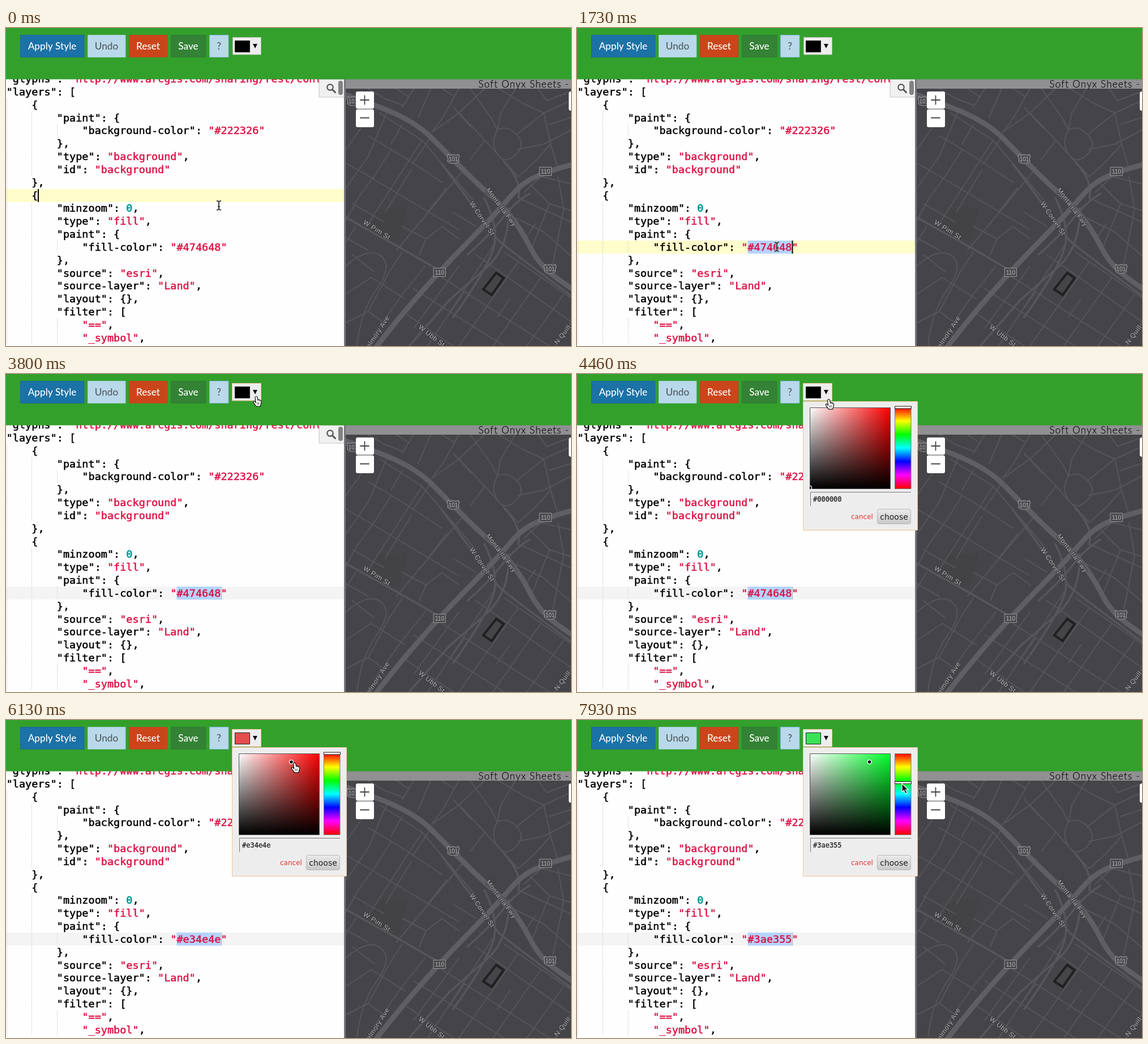
Recreate the animation shown at these times as an HTML page with a canvas. Size 998 by 561 pixels, loop 8000 ms.

```html
<!DOCTYPE html>
<html lang="en">
<head>
<meta charset="utf-8">
<title>Style editor</title>
<style>
html, body { margin: 0; width: 100%; height: 100%; overflow: hidden; background: #fefefe; }
canvas { display: block; }
</style>
</head>
<body>
<canvas id="stage" width="998" height="561"></canvas>
<script>
const ctx = document.getElementById('stage').getContext('2d');
const LOOP = 8000, STEP = 1000 / 15;
const MONO = '"DejaVu Sans Mono", monospace', SANS = '"DejaVu Sans", sans-serif';
const UI = 'Lato, sans-serif', MAP = '"Liberation Sans", Arial, sans-serif';
const CHAR = 11.14, LEFT = 0.7, LINE = 22.83, TOP = 112.4;

// Rows are [time, ...values]
const POINTER = [
  [70, 376, 313], [600, 353, 386], [2270, 353, 386], [2400, 385, 254],
  [2600, 385, 254], [2800, 398, 129], [2930, 398, 129], [3130, 430, 61],
  [3270, 430, 61], [3600, 442, 40], [4330, 442, 40], [4660, 454, 64],
  [5000, 454, 64], [5260, 464, 65], [5530, 464, 65], [5860, 508, 76],
  [6070, 508, 76], [6530, 520, 75], [6730, 520, 75], [6800, 522, 73],
  [7130, 574, 95], [7400, 574, 109], [7800, 574, 109], [7930, 574, 112]
];
const HSV = [
  [5000, 0, .27, .9686], [5260, 0, .332, .9686], [5530, 0, .332, .9686],
  [5860, 0, .64, .8902], [6070, 0, .64, .8902], [6530, 0, .744, .8902],
  [7070, 0, .744, .8902], [7130, 100, .744, .8902], [7400, 121, .744, .8902],
  [7800, 121, .744, .8902], [7930, 129.6, .744, .8902]
];

const CODE = [
  '"glyphs": "http://www.arcgis.com/sharing/rest/content',
  '"layers": [', '    {', '        "paint": {',
  '            "background-color": "#222326"', '        },',
  '        "type": "background",', '        "id": "background"', '    },',
  '    {', '        "minzoom": 0,', '        "type": "fill",', '        "paint": {',
  '            "fill-color": "$"', '        },', '        "source": "esri",',
  '        "source-layer": "Land",', '        "layout": {},', '        "filter": [',
  '            "==",', '            "_symbol",'
];

const STREETS = [
  'M600 283L640 226L672 150M600 215L640 158M640 345L735 198M690 392L812 246M600 340L622 300L650 262' +
  'M600 238L645 264L722 310L800 356M640 190L700 226L770 272M660 150L735 198L830 310M612 310L668 342' +
  'M680 205L700 170M718 240L752 190M650 262L680 215M690 292L716 250M745 325L778 282M670 325L690 292' +
  'M640 107L668 124L700 136M720 107L700 140M690 107L712 122M750 107L728 158M800 107L770 160L752 184M770 107L792 121',
  'M752 184L800 150L845 107M800 150L846 198L880 236L905 262M820 107L858 160L868 180Q885 170 902 188T900 224T868 222T868 180' +
  'M900 107L874 150L868 180M846 198L820 232M902 188L950 150L998 128M904 214L950 205L998 180M950 150L962 205L975 248' +
  'M870 107L915 134L950 150M940 107L955 128L998 112M960 170L998 158M905 262L935 235L962 205M790 140L822 175',
  'M600 420Q640 385 662 402T655 460T620 561M600 470L645 440L705 478M612 400L650 430M600 520L640 500L670 522' +
  'M700 395L676 432L640 500M740 420L700 470L650 540M720 460L880 561M770 440L960 561M700 500L790 561' +
  'M830 400L998 518M880 395L998 476M800 420L720 530M860 385L745 561M905 412L800 561M945 440L860 561' +
  'M985 470L920 561M998 520L970 561M810 466L780 508M890 478L868 510',
  'M905 300L998 342M925 275L960 310L998 322M900 335L950 360L998 402M960 310L930 385M985 320L965 420M935 345L915 375' +
  'M915 290L945 262L998 275M975 262L985 320M770 350L800 372M790 325L830 350M600 370L640 392M618 350L600 378' +
  'M700 350L742 372L770 350M742 372L730 400'
];
const AVENUES = 'M600 334L650 362L704 392L766 428M770 240L822 310L870 375Q900 400 998 472' +
  'M713 560L783 480L854 418Q890 380 888 318M905 300Q912 270 880 236' +
  'M815 400Q850 370 875 338T925 292M845 300Q870 350 862 385T790 510';
const FREEWAYS = 'M600 118C650 136 712 154 752 194S822 266 850 290S905 345 925 385S970 440 1000 460' +
  'M652 565C700 503 730 470 766 430S850 345 880 310S920 262 1000 241';

function box(x, y, w, h, fill, stroke, r = 0) {
  ctx.beginPath();
  ctx.roundRect(x, y, w, h, r);
  if (fill) { ctx.fillStyle = fill; ctx.fill(); }
  if (stroke) { ctx.strokeStyle = stroke; ctx.lineWidth = 1; ctx.stroke(); }
}

function text(s, x, y, font, color, align = 'left', spacing = 0, weight = 0) {
  ctx.font = font;
  ctx.fillStyle = ctx.strokeStyle = color;
  ctx.textAlign = align;
  ctx.letterSpacing = spacing + 'px';
  ctx.fillText(s, x, y);
  if (weight) { ctx.lineWidth = weight; ctx.strokeText(s, x, y); }
}

function path(d, color, width) {
  ctx.strokeStyle = color;
  ctx.lineWidth = width;
  ctx.stroke(new Path2D(d));
}

function shape(d, x, y, fill, stroke) {
  const p = new Path2D(d);
  ctx.save();
  ctx.translate(x, y);
  ctx.fillStyle = fill;
  ctx.fill(p);
  ctx.strokeStyle = stroke;
  ctx.lineWidth = 1.2;
  ctx.stroke(p);
  ctx.restore();
}

function clipTo(x, y, w, h, draw) {
  ctx.save();
  ctx.beginPath();
  ctx.rect(x, y, w, h);
  ctx.clip();
  draw();
  ctx.restore();
}

function at(rows, t) {
  let i = rows.findIndex(r => r[0] > t);
  if (i < 0) i = rows.length;
  const a = rows[Math.max(i - 1, 0)], b = rows[Math.min(i, rows.length - 1)];
  const k = b[0] > a[0] ? (t - a[0]) / (b[0] - a[0]) : 0;
  return a.slice(1).map((v, j) => v + (b[j + 1] - v) * k);
}

function hex(h, s, v) {
  return '#' + [5, 3, 1].map(n => {
    const k = (n + h / 60) % 6;
    const c = v - v * s * Math.max(0, Math.min(k, 4 - k, 1));
    return Math.round(c * 255).toString(16).padStart(2, '0');
  }).join('');
}

function header() {
  box(0, 0, 998, 90.5, '#33a02c');
  const button = (label, x, w, fill, edge, color) => {
    box(x + .5, 12.5, w - .5, 39, fill, edge);
    text(label, x + w / 2, 38, '500 17.2px ' + UI, color, 'center');
  };
  button('Apply Style', 25, 113, '#1b72a6', '#1c6a8c', '#fff');
  button('Undo', 144, 67, '#b9d9ea', '#9accc4', '#565c60');
  button('Reset', 217, 68, '#cb451b', '#a8521c', '#fff');
  button('Save', 291, 62, '#348235', '#2f7c30', '#fff');
  button('?', 359, 34, '#b9d9ea', '#80b4d8', '#4b5459');
}

function streetLabel(s, x, y, angle) {
  ctx.save();
  ctx.translate(x, y);
  ctx.rotate(angle * Math.PI / 180);
  ctx.lineWidth = 2;
  ctx.strokeStyle = '#39383c';
  ctx.font = '12px ' + MAP;
  ctx.textAlign = 'center';
  ctx.letterSpacing = '.5px';
  ctx.strokeText(s, 0, 4);
  text(s, 0, 4, '12px ' + MAP, '#b4b3b6', 'center', .5);
  ctx.restore();
}

function map() {
  box(600, 90, 398, 471, '#454449');
  shape('M655 320L708 318L694 374L645 362Z', 0, 0, '#434346', '#434346');
  ctx.lineJoin = ctx.lineCap = 'round';
  STREETS.forEach(d => path(d, '#56555a', 2));
  path(AVENUES, '#57565b', 3.5);
  path(FREEWAYS, '#5f5e63', 9);
  ctx.lineJoin = 'miter';
  path('M866 432L879 441L858 471L843 461Z', '#202022', 4);

  for (const [x, y] of [[613, 129], [790, 231], [961, 425]]) {
    shape('M-9 -8Q-5 -5 0 -8Q5 -5 9 -8L11 -4Q8 0 10 4Q7 8 0 8Q-7 8 -10 4Q-8 0 -11 -4Z', x, y, '#4b4a4e', '#98979a');
    text('101', x, y + 3.5, '10px ' + MAP, '#b4b3b6', 'center');
  }
  for (const [x, y] of [[953, 253], [766, 431]]) {
    box(x - 10.5, y - 7.5, 21, 15, '#4b4a4e', '#98979a');
    text('110', x, y + 4, '10.5px ' + MAP, '#b4b3b6', 'center');
  }
  streetLabel('W Pim St', 655, 356, 32);
  streetLabel('W Corvel St', 841, 336, 56);
  streetLabel('Monta Ila Fwy', 875, 316, 53);
  streetLabel('elmory Ave', 657, 536, -57);
  streetLabel('W Ubb St', 752, 543, 38);
  streetLabel('N Quill', 983, 541, -53);

  box(600, 90, 398, 17, 'rgba(255,255,255,.4)');
  text('Soft Onyx Sheets -', 995, 105, '300 17px ' + UI, '#111', 'right', 1.25, .3);
  box(618, 112, 32, 30.5, '#fff', null, 3);
  box(618, 143.5, 32, 31.5, '#fff', null, 3);
  path('M626 127H641M633.5 119.5V134.5M626 158.5H641', '#444', 1.8);
  box(994, 112, 10, 34, '#fff', null, 4);
}

function codeLine(line, y) {
  // Strings, numbers and the rest are coloured apart
  for (const m of line.matchAll(/"[^"]*"?|\d+|[^"\s\d]+/g)) {
    const x = LEFT + m.index * CHAR, value = line.slice(0, m.index).includes(':');
    const key = line.slice(m.index + m[0].length).startsWith(':');
    const number = /^\d/.test(m[0]);
    const color = number ? '#009999' : m[0][0] === '"' && (value || !key) ? '#dd1144' : '#000';
    text(m[0], x, y, '18.5px ' + MONO, color, 'left', 0, number ? .8 : .5);
  }
}

function editor(t, color) {
  box(0, 90, 597, 471, '#fefefe');
  const row = t < 600 ? 8 : 12, y = Math.round(TOP + row * LINE - 11.4);
  const blurred = t >= 3730;
  box(0, y, 597, 23, blurred ? '#f4f4f4' : '#fefdcb');
  if (t >= 930) box(301.5, y, 78, 23, '#b5d4fd');

  CODE.forEach((line, i) => {
    const cy = TOP + (i - 1) * LINE, indent = line.search(/\S/) / 4;
    ctx.setLineDash([1, 1]);
    for (let k = 0; k < indent; k++)
      path(`M${Math.round(LEFT + k * 4 * CHAR) + .5} ${cy - 11}v22`, '#dedede', 1);
    ctx.setLineDash([]);
    codeLine(line.replace('$', color), cy + 6.5);
  });

  const hidden = (t >= 1330 && t < 1730) || (t >= 2400 && t < 2730);
  if (blurred) box(380, y, 1, 23, '#aaa');
  else if (!hidden) box(row === 8 ? 56 : 379.5, y, 2, 23, '#000');

  box(553.5, 90.5, 44, 31.5, '#f0f0f0', '#c4c4c4');
  box(587, 93, 8, 25, '#828282', null, 4);
  ctx.beginPath();
  ctx.arc(572.5, 104.5, 5.2, 0, 7);
  ctx.strokeStyle = '#555';
  ctx.lineWidth = 2.2;
  ctx.stroke();
  path('M576.5 108.5L581.5 113.5', '#555', 3);
  box(597, 90, 3, 471, '#77767a');
}

function gradient(x0, y0, x1, y1, colors) {
  const g = ctx.createLinearGradient(x0, y0, x1, y1);
  colors.forEach((c, i) => g.addColorStop(i / (colors.length - 1), c));
  return g;
}

function picker(t, [h, s, v], color) {
  const active = t >= 3730, open = t >= 3860;
  box(active ? 399.5 : 400.5, 16.5, active ? 51 : 50, 30.5, '#eeeded', active ? '#eec39a' : '#a5bf9f');
  box(404.5, 22.5, 26, 20, color, '#222');
  shape('M436 28H444L440 36Z', 0, 0, '#111', 'transparent');
  if (!open) return;

  box(399.5, 48.5, 202, 227, '#eeeded', '#eec39a');
  box(411.5, 59.5, 142, 143, hex(h, 1, 1));
  box(411.5, 59.5, 142, 143, gradient(412, 0, 554, 0, ['#fff', 'rgba(255,255,255,0)']));
  box(411.5, 59.5, 142, 143, gradient(0, 59, 0, 202, ['rgba(0,0,0,0)', '#000']), '#555');
  box(561.5, 59.5, 28.5, 143, gradient(0, 59, 0, 202, [0, 60, 120, 180, 240, 300, 0].map(a => hex(a, 1, 1))), '#777');

  const hueY = 59 + h / 360 * 143;
  box(561.5, hueY - 2, 29, 4, '#fff', '#111');
  clipTo(411, 58, 144, 146, () => {
    ctx.beginPath();
    ctx.arc(411 + 142 * s, 58.5 + 142 * (1 - v), 3.4, 0, 7);
    ctx.fillStyle = '#000';
    ctx.fill();
    ctx.strokeStyle = '#fff';
    ctx.lineWidth = 1.3;
    ctx.stroke();
  });

  path('M412.5 233V208.5H590', '#777', 1);
  text(color, 417, 225, '12px ' + MONO, '#222', 'left', 0, .3);
  text('cancel', 484, 256, '12px ' + SANS, '#dc3434');
  box(530.5, 238.5, 59, 26, gradient(0, 238, 0, 265, ['#ececec', '#c6c6c6']), '#b8b8b8', 3);
  text('choose', 560, 257, '14px ' + SANS, '#222', 'center');
}

function pointer(t) {
  const [x, y] = at(POINTER, t);
  if (t < 3130) {
    ctx.save();
    ctx.translate(x, y);
    const beam = 'M-4 -8Q0 -8 0 -5Q0 -8 4 -8M0 -6V6M-4 8Q0 8 0 5Q0 8 4 8M-2 2H2';
    path(beam, 'rgba(255,255,255,.6)', 3.4);
    path(beam, '#444', 2);
    ctx.restore();
  } else if (t < 3460 || t >= 6800) {
    shape('M0 0V15L3.5 12L6 18L9 16.8L6.5 11H11Z', x, y, '#111', '#fff');
  } else {
    shape('M-2 1Q0 -2 2 1L3 6Q4 4 5 6Q6.5 5 7 7Q9 6 9 9L8 14L7 17H0L-5 10Q-6 7 -3 8L-1 10Z', x, y, '#fff', '#111');
    path(`M${x + 2} ${y + 10}v4M${x + 4.5} ${y + 10}v4`, '#333', 1);
  }
}

function frame(now) {
  const t = Math.floor((now % LOOP + 4) / STEP) * STEP + .5;
  const picked = t >= 5060, hsv = picked ? at(HSV, t) : [0, 0, 0];
  const color = hex(...hsv);
  ctx.clearRect(0, 0, 998, 561);
  clipTo(0, 90, 998, 471, () => {
    map();
    editor(t, picked ? color : '#474648');
  });
  header();
  picker(t, hsv, color);
  pointer(t);
}

const start = performance.now();
function tick() {
  frame(performance.now() - start);
  requestAnimationFrame(tick);
}
tick();
</script>
</body>
</html>
```
